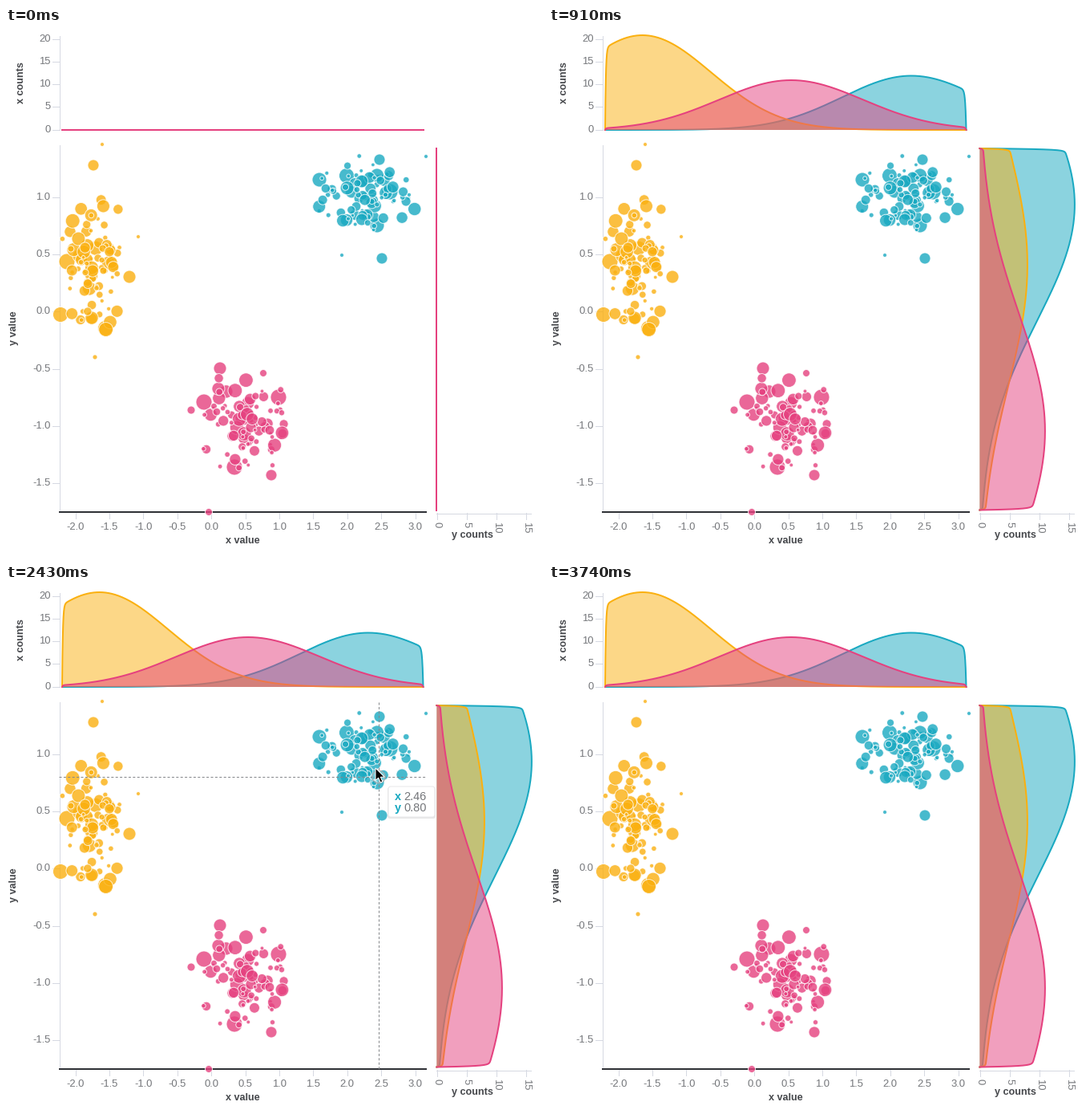
Animation of 670 by 659 pixels, one loop 4450 ms. Source, as a matplotlib script:

```python
import numpy as np
import matplotlib.pyplot as plt
from matplotlib.animation import FuncAnimation
from matplotlib.patches import Circle, FancyBboxPatch, Polygon

W, H, DPI = 670, 659, 100
LOOP, STEP = 4450, 25
PX = 72 / DPI  # points per pixel

TEAL, YELLOW, PINK = "#19a9c1", "#fab010", "#e5417f"
AXIS, TICK_TEXT, BOLD_TEXT = "#d6d9e2", "#75777b", "#46484c"

plt.rcParams["font.family"] = "Liberation Sans"
fig = plt.figure(figsize=(W / DPI, H / DPI), dpi=DPI, facecolor="white")
ax = fig.add_axes([0, 0, 1, 1])
ax.set_xlim(0, W)
ax.set_ylim(H, 0)
ax.axis("off")


def line(xs, ys, color=AXIS, width=1, **kw):
    return ax.plot(xs, ys, color=color, lw=width * PX, **kw)[0]


def text(x, y, s, size=13, color=TICK_TEXT, ha="center", va="center", **kw):
    return ax.text(x, y, s, fontsize=size * PX, color=color, ha=ha, va=va, **kw)


def title(x, y, s, rotation=0):
    text(x, y, s, 12.6, BOLD_TEXT, weight="bold", rotation=rotation)


# Plot scales: pixel position of zero and pixels per unit
X0, X_UNIT = 256.2, 84.8
Y0, Y_UNIT = 353.2, -142.6

# Axes
line([66.5, 66.5], [10, 127])
for v in range(0, 21, 5):
    y = 126.5 - 5.64 * v
    line([58, 66], [y, y])
    text(55.5, y, str(v), ha="right")

line([66.5, 66.5], [146, 603])
for v in np.arange(-1.5, 1.1, 0.5):
    y = Y0 + Y_UNIT * v
    line([58, 66], [y, y])
    text(55.5, y, f"{v:.1f}", ha="right")

for v in np.arange(-2, 3.1, 0.5):
    x = X0 + X_UNIT * v
    line([x, x], [604, 611])
    text(x, 622, f"{v:.1f}")
line([66, 524.5], [603, 603], "#2f3136", 2, zorder=3, solid_capstyle="butt")

line([537, 655], [604.5, 604.5])
for v in range(0, 16, 5):
    x = 537.5 + 7.42 * v
    line([x, x], [604, 612])
    text(x, 615, str(v), va="top", rotation=270)

title(18.5, 68.5, "x counts", 90)
title(10.5, 374, "y value", 90)
title(295, 639, "x value")
title(581.5, 632.5, "y counts")


def cluster(color, centre, reach, seed, landmarks):
    """Random dots thinning out from the centre, plus a few (x, y, radius)."""
    rng = np.random.default_rng(seed)
    n = 88
    spots = centre + reach * rng.triangular(-1, 0, 1, (n, 2))
    radii = 2.3 + 6.7 * rng.random(n) ** 1.4
    x, y, r = np.vstack([landmarks, np.column_stack([spots, radii])]).T
    ax.scatter(x, y, s=(2 * r * PX) ** 2, color=color, alpha=0.8,
               edgecolors="white", linewidths=PX, zorder=4)


cluster(YELLOW, (107, 288), np.array([42, 104]), 4,
        [(120, 145, 2.5), (109, 171, 7), (165, 260, 2.5), (154, 310, 8),
         (76, 291, 10), (68, 357, 9.5), (124, 374, 9.5), (111, 410, 3)])
cluster(TEAL, (450, 207), np.array([66, 52]), 7,
        [(524, 160, 2.5), (391, 189, 9), (425, 184, 9.5), (466, 164, 7),
         (479, 204, 10), (463, 246, 9), (469, 287, 7), (419, 283, 2.5)])
cluster(PINK, (298, 497), np.array([60, 66]), 2,
        [(267, 424, 8), (321, 430, 4.5), (231, 476, 5), (253, 603, 4.5),
         (247, 466, 10), (340, 460, 10), (296, 485, 10), (285, 547, 10),
         (331, 557, 7)])

# Density curves
U = (1 - np.cos(np.linspace(0, np.pi, 360))) / 2


class Density:
    """Bell curve cut off at both ends, growing along its length."""

    def __init__(self, color, centre, sigma, peak, side, order):
        self.side = side
        self.lead, self.ramp = (0.09, 0.44) if side else (0.2, 0.53)
        self.pos = (150 if side else 70) + 450.5 * U
        edge = (1 - np.exp(-450 * U / 0.9)) * (1 - np.exp(-450 * (1 - U) / 1.1))
        self.full = peak * np.exp(-((self.pos - centre) / sigma) ** 2 / 2) * edge
        self.fill = Polygon([(0, 0), (0, 1)], fc=color, alpha=0.5, lw=0, zorder=order)
        ax.add_patch(self.fill)
        self.stroke = line([], [], color, 2, zorder=order + 0.05)

    def grow(self, k):
        front = self.lead + 0.14 * k if k >= 0 else 0
        size = self.full * np.clip((front - U) / self.ramp, 0, 1)
        x, y = (537.4 + size, self.pos) if self.side else (self.pos, 127 - size)
        self.fill.set_xy(np.column_stack([x, y]))
        self.stroke.set_data(x, y)


CURVES = [
    Density(TEAL, 452, 86, 67.5, False, 5.0),
    Density(YELLOW, 116.5, 86, 118, False, 5.1),
    Density(PINK, 302, 90, 62, False, 5.2),
    Density(TEAL, 220, 144, 118.5, True, 5.0),
    Density(YELLOW, 295, 149, 59.5, True, 5.1),
    Density(PINK, 502, 145, 81.5, True, 5.2),
]

# Crosshair, tooltip and pointer
dash = dict(color="#85878b", width=1, linestyle=(0, (3, 2.4)), zorder=6)
v_line = line([], [], **dash)
h_line = line([], [], **dash)
ring = Circle((0, 0), 8, fc=(1, 1, 1, 0.25), ec="#a9a5a8", lw=PX, zorder=6.1)
rounded = "round,pad=0,rounding_size=3"
shadow = FancyBboxPatch((0, 0), 1, 1, boxstyle=rounded, fc="black", alpha=0.09,
                        lw=0, zorder=7)
box = FancyBboxPatch((0, 0), 1, 1, boxstyle=rounded, fc="white", ec="#e8e8ea",
                     lw=PX, zorder=7.1)
for patch in (ring, shadow, box):
    ax.add_patch(patch)
label = dict(size=14.5, ha="left", va="baseline", zorder=7.2)
names = [text(0, 0, s, weight="bold", **label) for s in "xy"]
values = [text(0, 0, "", **label) for _ in "xy"]
HOVER_PARTS = [v_line, h_line, ring, shadow, box, *names, *values]

ARROW = np.array([(0, 0), (0, 15.5), (3.6, 12.2), (6.2, 18), (8.8, 16.9),
                  (6.3, 11.2), (11.2, 11.2)])
pointer = Polygon(ARROW, fc="black", ec="white", lw=PX, zorder=9)
ax.add_patch(pointer)

# start, end, x and y of the dot in focus
HOVERS = [
    (1420, 1680, 286, 480), (1680, 1760, 296.5, 485), (1760, 2030, 341, 493),
    (2030, 2430, 436, 243), (2430, 2610, 465, 239), (2610, 3100, 316.5, 483),
    (3330, 3660, 331, 557),
]
# time, pointer x, pointer y
PATH = np.array([
    (1420, 256, 462), (1680, 311, 483), (1755, 311, 483), (2030, 372, 405),
    (2430, 461, 228), (2515, 461, 228), (2920, 278, 497), (3005, 278, 497),
    (3100, 279, 530), (3189, 279, 530), (3190, 193, 574), (3330, 193, 574),
    (3740, 518, 660),
]).T


def show_hover(t):
    focus = next((h[2:] for h in HOVERS if h[0] <= t < h[1]), None)
    for part in HOVER_PARTS:
        part.set_visible(focus is not None)
    if focus is None:
        return
    px, py = focus
    v_line.set_data([px, px], [146, 603])
    h_line.set_data([66, 524], [py, py])
    ring.center = focus
    data = (px - X0) / X_UNIT, (py - Y0) / Y_UNIT
    tx, ty = px + 20, py + 24
    width = 62 if min(data) < 0 else 58
    box.set_bounds(tx - 8, ty - 12, width, 38)
    shadow.set_bounds(tx - 9, ty - 11, width + 2, 39)
    for i, (name, value) in enumerate(zip(names, values)):
        base = ty + 5 + 14 * i
        name.set_position((tx, base))
        name.set_color(TEAL if data[1] > 0 else PINK)
        value.set_position((tx + 11.5, base))
        value.set_text(f"{data[i]:.2f}")


def update(n):
    t = n * STEP + 20
    k = min((t - 50) // 85, 10)  # the curves grow in ten visible jumps
    for curve in CURVES:
        curve.grow(k)
    show_hover(t)
    pointer.set_visible(PATH[0, 0] <= t < PATH[0, -1])
    spot = [np.interp(t, PATH[0], PATH[i]) for i in (1, 2)]
    pointer.set_xy(ARROW + spot)
    return []


anim = FuncAnimation(fig, update, frames=LOOP // STEP, interval=STEP,
                     init_func=lambda: update(0), repeat=True, repeat_delay=0)
plt.show()
```
